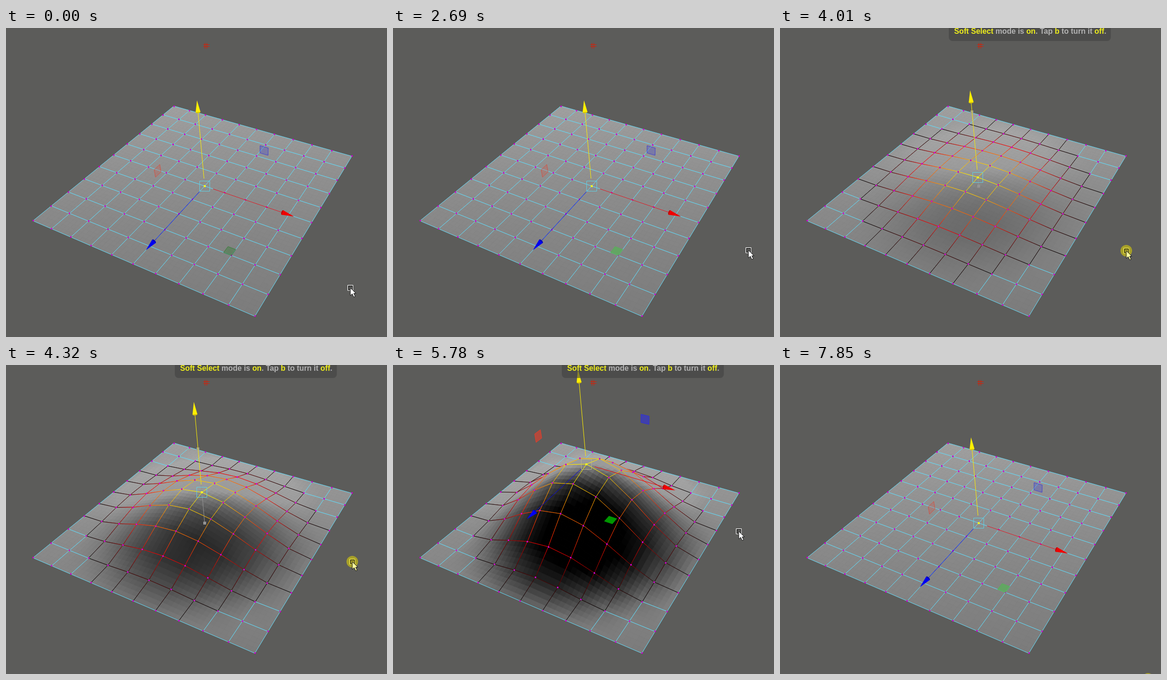
An HTML page with a canvas for the animation above (7.93 s loop, 790 by 641 pixels).

```html
<!DOCTYPE html>
<html lang="en">
<head>
<meta charset="utf-8">
<title>Soft selection</title>
<style>
html, body { margin: 0; width: 100%; height: 100%; overflow: hidden; background: #5c5c5a; }
canvas { display: block; }
</style>
</head>
<body>
<canvas id="stage" width="790" height="641"></canvas>
<script>
const ctx = document.getElementById('stage').getContext('2d');
const LOOP = 7930, N = 10, SUB = 5;
const CENTER_W = 0.807, RISE = 0.259, CYAN = '#62dcfa';

// time, value, time, value ...
const LIFT = [670, 0, 1210, 92, 1450, 99, 2459, 99, 2460, 0, 3850, 0, 4010, 18,
  4630, 109, 4860, 122, 6009, 122, 6010, 0];
const CURSOR_X = [70, 714, 220, 706, 520, 738, 1210, 737, 3240, 737, 3700, 718,
  5780, 717, 6470, 748, 7850, 763];
const CURSOR_Y = [70, 539, 220, 496, 520, 578, 670, 578, 1210, 468, 1450, 461,
  3240, 461, 3700, 478, 3850, 478, 4010, 462, 4630, 354, 4860, 345, 5780, 345,
  6470, 655, 7850, 651];
const TIP = [361, 'Soft Select', ' mode is ', 'on', '. Tap ', 'b', ' to turn it ', 'off', '.'];

const mix = (a, b, k) => a + (b - a) * k;
const clamp = (x, lo, hi) => Math.min(hi, Math.max(lo, x));
const within = (t, a, b) => t >= a && t < b;

function track(keys, t) {
  if (t <= keys[0]) return keys[1];
  for (let i = 2; i < keys.length; i += 2) {
    if (t < keys[i]) {
      return mix(keys[i - 1], keys[i + 1], (t - keys[i - 2]) / (keys[i] - keys[i - 2]));
    }
  }
  return keys[keys.length - 1];
}

// Perspective view of the unit plane (u, v) with height z.
function project(u, v, z) {
  const s = z * RISE, w = 1 - 0.13101 * u - 0.25507 * v - s;
  return {
    x: (275.07 * u - 306.28 * v + 348 - 513 * s) / w,
    y: (69.15 * u + 135.97 * v + 162 - 1460 * s) / w
  };
}

function falloff(i, j, soft) {
  const d = Math.hypot(i - N / 2, j - N / 2) / (N / 2);
  if (d === 0) return 1;
  return soft && d < 0.999 ? 1 - 3 * d * d + 2 * d * d * d : 0;
}

function ramp(f) {
  return f > 0.35 ? `rgb(255,${Math.round(255 * (f - 0.35) / 0.65)},0)`
                  : `rgb(${Math.round(255 * f / 0.35)},0,0)`;
}

function path(points, closed) {
  ctx.beginPath();
  for (const p of points) ctx.lineTo(p.x, p.y);
  if (closed) ctx.closePath();
}

function line(a, b, color) {
  path([a, b]);
  ctx.strokeStyle = color;
  ctx.stroke();
}

function dot(p, size, color) {
  ctx.fillStyle = color;
  ctx.fillRect(Math.round(p.x - size / 2), Math.round(p.y - size / 2), size, size);
}

function buildMesh(z, soft) {
  const height = (i, j) => z * falloff(clamp(i, 0, N), clamp(j, 0, N), soft);
  const mesh = [];
  for (let j = 0; j <= N; j++) {
    mesh.push([]);
    for (let i = 0; i <= N; i++) {
      const k = (soft ? 1 : 0.3) * N / 2;
      const du = (height(i + 1, j) - height(i - 1, j)) * k;
      const dv = (height(i, j + 1) - height(i, j - 1)) * k;
      const u = i / N, v = j / N;
      mesh[j].push({
        ...project(u, v, height(i, j)),
        f: falloff(i, j, soft),
        base: 160 - 12.4 * u - 24.2 * v,
        light: (1 + 1.5 * (0.45 * du + 0.89 * dv)) / Math.hypot(1, du, dv)
      });
    }
  }
  return mesh;
}

function fillQuad(a, b, c, d) {
  const at = (key, p, q) => mix(mix(a[key], b[key], p), mix(d[key], c[key], p), q);
  const point = (p, q) => ({ x: at('x', p, q), y: at('y', p, q) });
  const step = 1 / SUB;
  for (let q = 0; q < 1 - 1e-6; q += step) {
    for (let p = 0; p < 1 - 1e-6; p += step) {
      const light = clamp(at('light', p + step / 2, q + step / 2), 0, 1.08);
      const g = Math.round(at('base', p, q) * light);
      ctx.fillStyle = ctx.strokeStyle = `rgb(${g},${g},${g})`;
      path([point(p, q), point(p + step, q), point(p + step, q + step), point(p, q + step)], true);
      ctx.fill();
      ctx.stroke();
    }
  }
}

function edge(a, b, soft) {
  let color = CYAN;
  if (soft && (a.f || b.f)) {
    color = ctx.createLinearGradient(a.x, a.y, b.x, b.y);
    color.addColorStop(0, ramp(a.f));
    color.addColorStop(1, ramp(b.f));
  }
  line(a, b, color);
}

// Cells are painted from the far corner to the near one.
function drawMesh(mesh, soft) {
  for (let j = 0; j < N; j++) {
    for (let i = 0; i < N; i++) {
      const q = [mesh[j][i], mesh[j][i + 1], mesh[j + 1][i + 1], mesh[j + 1][i]];
      ctx.lineWidth = 0.8;
      fillQuad(...q);
      ctx.lineWidth = 1;
      q.forEach((p, k) => edge(p, q[(k + 1) % 4], soft));
      for (const p of q) dot(p, 3, p.f === 1 ? '#ffff30' : '#cc00cc');
    }
  }
}

function arrow(from, base, tip, color, shade) {
  line(from, base, color);
  const a = Math.atan2(tip.y - base.y, tip.x - base.x);
  const nx = -Math.sin(a) * 5, ny = Math.cos(a) * 5;
  ctx.fillStyle = shade;
  ctx.beginPath();
  ctx.ellipse(base.x, base.y, 2.5, 5, a, 0, 7);
  ctx.fill();
  path([{ x: base.x + nx, y: base.y + ny }, tip, { x: base.x - nx, y: base.y - ny }], true);
  ctx.fillStyle = color;
  ctx.fill();
}

function drawManipulator(t, z, soft, drag) {
  const size = 0.423 * (CENTER_W - z * RISE) / CENTER_W;
  const at = (x, y, w) => project(0.5 + x * size, 0.5 + w * size, z + y * size);
  const axis = (x, y, w, color, shade) => {
    const on = k => at(x * k, y * k, w * k);
    arrow(on(0.1), on(0.88), on(1), color, shade);
  };
  const handle = (place, rgb, alpha) => {
    const lo = 0.63, hi = 0.71;
    path([place(lo, lo), place(hi, lo), place(hi, hi), place(lo, hi)], true);
    ctx.fillStyle = `rgba(${rgb},${alpha})`;
    ctx.strokeStyle = `rgba(${rgb},${Math.min(1, alpha + 0.5)})`;
    ctx.fill();
    ctx.stroke();
  };
  const c = at(0, 0, 0);
  const raised = soft && z > 0;

  if (drag) {
    const start = project(0.5, 0.5, 0), end = project(0.5, 0.5, 0.372);
    line(start, end, '#949494');
    dot(start, 6, '#949494');
    dot(end, 6, '#949494');
  } else {
    handle((p, q) => at(0, p, q), '235,60,40', raised ? 0.6 : 0.2);
    handle((p, q) => at(p, q, 0), '45,45,225', raised ? 0.6 : 0.25);
    if (raised) handle((p, q) => at(p, 0, q), '0,150,0', 1);
    else if (t < 2460) handle((p, q) => at(p, 0, q), '50,125,50', 0.4);
    else handle((p, q) => at(p, 0, q), '85,180,85', 0.7);
    axis(0, 0, 1, '#0000f0', '#0000b8');
    axis(1, 0, 0, '#f00000', '#c00000');
  }
  axis(0, 1, 0, '#fff000', '#d8c400');

  ctx.strokeStyle = raised && !drag ? '#b9b48a' : '#5fd0e4';
  ctx.strokeRect(Math.round(c.x) - 10.5, Math.round(c.y) - 10.5, 21, 21);
  dot(c, 4, '#ffff20');
}

function drawMarker() {
  ctx.fillStyle = '#dc1c00';
  for (const o of [-3, 1]) {
    ctx.fillRect(415 + o, 31, 1, 12);
    ctx.fillRect(409, 37 + o, 13, 1);
  }
}

function drawCursor(x, y, pressed) {
  ctx.save();
  ctx.translate(Math.round(x), Math.round(y));
  if (pressed) {
    ctx.fillStyle = 'rgba(200,190,20,.7)';
    ctx.beginPath();
    ctx.arc(0, 0, 12, 0, 7);
    ctx.fill();
  }
  ctx.strokeStyle = '#111';
  ctx.strokeRect(-3.5, -3.5, 8, 8);
  ctx.strokeStyle = pressed ? '#f4ec50' : '#fff';
  ctx.strokeRect(-5.5, -5.5, 11, 11);
  ctx.fillStyle = pressed ? '#ffffa0' : '#fff';
  ctx.strokeStyle = '#111';
  ctx.fill(new Path2D('M0 0V16L4 12.5L7 19L10 18L7 11.5H11.5Z'));
  ctx.stroke(new Path2D('M0 0V16L4 12.5L7 19L10 18L7 11.5H11.5Z'));
  ctx.restore();
}

function drawTip(alpha) {
  if (alpha <= 0) return;
  ctx.globalAlpha = alpha;
  ctx.fillStyle = 'rgba(66,66,66,.6)';
  ctx.beginPath();
  ctx.roundRect(350, -20, 336, 47, 8);
  ctx.fill();
  ctx.font = 'bold 15.75px "Liberation Sans", Arial, sans-serif';
  let [x, ...parts] = TIP;
  parts.forEach((text, i) => {
    ctx.fillStyle = i % 2 ? '#b2b2b2' : '#ecec1c';
    ctx.fillText(text, x, 12);
    x += ctx.measureText(text).width;
  });
  ctx.globalAlpha = 1;
}

function draw(t) {
  const soft = within(t, 3240, 7550);
  const drag = within(t, 670, 1760) || within(t, 3850, 5320);
  const lift = track(LIFT, t);
  const z = CENTER_W * lift / (1132 + lift) / RISE;

  ctx.fillStyle = '#5c5c5a';
  ctx.fillRect(0, 0, 790, 641);
  ctx.lineJoin = 'round';
  ctx.lineWidth = 1;
  drawMarker();
  drawMesh(buildMesh(z, soft), soft);
  drawManipulator(t, z, soft, drag);
  drawTip(track([3240, 0, 3400, 1, 6000, 1, 6780, 0], t));
  drawCursor(track(CURSOR_X, t), track(CURSOR_Y, t), drag || t >= 7850);
}

let begin;
function tick(now) {
  begin ??= now;
  draw((now - begin) % LOOP);
  requestAnimationFrame(tick);
}
requestAnimationFrame(tick);
</script>
</body>
</html>
```
